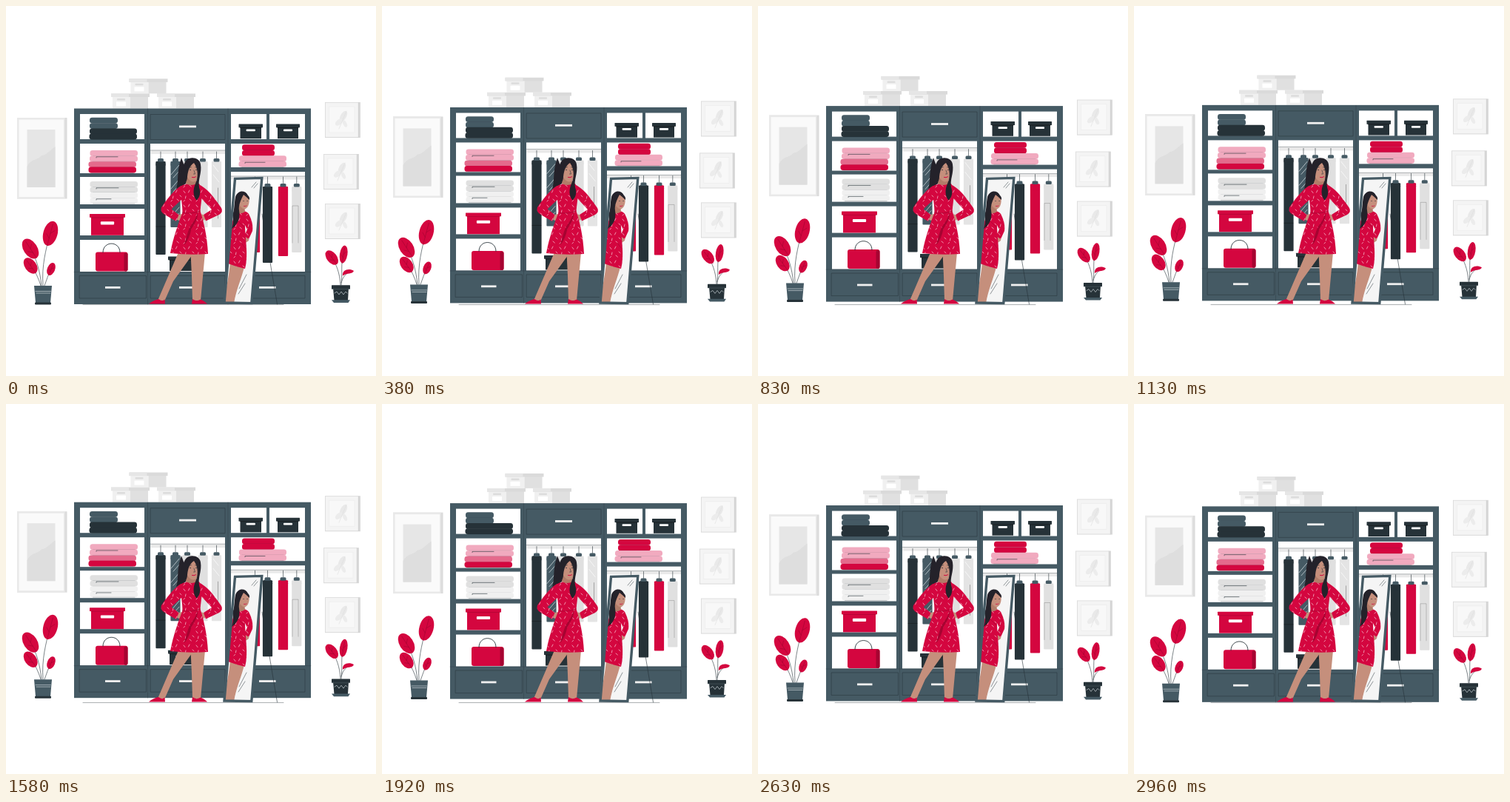
These frames come from a looping animation (500 by 500 pixels, 3000 ms). An HTML page:

```html
<!DOCTYPE html>
<html>
<head>
<meta charset="utf-8">
<style>
html, body { margin: 0; width: 100%; height: 100%; overflow: hidden; background: #fff; }
svg { display: block; width: 100vw; height: 100vh; }
</style>
</head>
<body>
<svg id="stage" viewBox="0 0 500 500" fill="none" stroke-linecap="round" stroke-linejoin="round"></svg>
<script>
const RED = '#d4063f', DEEP = '#a60431', PINK = '#f1aabf', ROSE = '#e46a8c';
const SLATE = '#455a64', DARK = '#263238', SKIN = '#c58f7c', HAIR = '#24222a';
const LIGHT = '#e0e0e0', PALE = '#f0f0f0', WHITE = '#fff';

// Shapes are given by their edges: left, top, right, bottom.
const box = (x, y, r, b, fill, rx = 0, more = '') =>
  `<rect x="${x}" y="${y}" width="${r - x}" height="${b - y}" fill="${fill}" rx="${rx}" ${more}/>`;
const shape = (d, fill, more = '') => `<path d="${d}" fill="${fill}" ${more}/>`;
const line = (d, color = DARK, w = .6) => `<path d="${d}" stroke="${color}" stroke-width="${w}"/>`;
const oval = (x, y, rx, ry, turn, fill) =>
  `<ellipse rx="${rx}" ry="${ry}" fill="${fill}" transform="translate(${x} ${y}) rotate(${turn})"/>`;
const group = (s, more = '') => `<g ${more}>${s}</g>`;

const folded = (x, y, r, fill) => box(x, y, r, y + 7.8, fill, 3.4) + line(`M${x + 4} ${y + 7.7}H${r - 4}`, DARK, .25);

const leaf = (x, y, rx, ry, turn) => oval(x, y, rx, ry, turn, RED) +
  group(line(`M0 ${-ry * .75}V${ry}M0 0l${rx * .5} ${-ry * .3}M0 ${ry * .4}l${-rx * .5} ${-ry * .3}`, DEEP, .6),
    `transform="translate(${x} ${y}) rotate(${turn})"`);

function hung(x, top, bottom, fill) {
  return line(`M${x} ${top - 13}V${top - 4}`) +
    box(x - 6.6, top, x + 6.6, bottom, fill, 1) +
    box(x - 6.6, top - 1, x + 6.6, top + 9, fill, 5) +
    box(x - 4, top - 4, x + 4, top + .5, SLATE, 1.5);
}

function crate(x, y) {
  return box(x + 2, y + 4, x + 26, y + 20, PALE) + box(x + 26, y + 4, x + 50, y + 20, LIGHT) +
    box(x, y, x + 52, y + 4.6, '#dadada') + box(x, y, x + 24, y + 4.6, '#e6e6e6') +
    box(x + 8, y + 6.5, x + 19, y + 9, '#dcdcdc', 1) + box(x + 7, y + 11, x + 20, y + 17, WHITE);
}

function lidBox(x, y, w, h, fill) {
  const c = x + w / 2;
  return box(x + 2, y + 4, x + w - 2, y + h, fill) + box(x, y, x + w, y + 4.8, fill, .5) +
    line(`M${x + 2} ${y + 5}H${x + w - 2}`, fill === RED ? DEEP : '#111', .6) +
    box(c - w * .19, y + h * .36, c + w * .19, y + h * .5, WHITE, 1);
}

function smallPicture(x, y) {
  return box(x, y, x + 48, y + 48, '#d9d9d9') + box(x + .8, y + .8, x + 45, y + 47, '#f4f4f4') +
    line(`M${x + 45.3} ${y + .5}V${y + 47.5}`, '#c9c9c9', .6) +
    box(x + 6, y + 6, x + 40, y + 41, '#f8f8f8', 0, 'stroke="#eee" stroke-width=".8"') +
    oval(x + 25, y + 19, 4, 8, 28, '#e9e9e9') + oval(x + 19, y + 27, 3.5, 6, 50, '#ececec') +
    oval(x + 27, y + 29, 2.5, 5, -25, '#ececec') + line(`M${x + 29} ${y + 12}L${x + 19} ${y + 36}`, '#dedede');
}

const pictures =
  box(15, 151, 82.5, 260.5, '#dcdcdc') + box(15, 151, 79.5, 260.5, '#e9e9e9') +
  box(17.5, 153.5, 78, 258, '#fafafa') + box(28.5, 167, 66.5, 245, '#e6e6e6') +
  shape('M28.5 245V217C34 206 42 209 48 202C54 202 58 196 66.5 190V245Z', '#dedede') +
  smallPicture(431, 130) + smallPicture(429, 200) + smallPicture(431, 267);

const frame = box(92, 138.5, 412, 403, SLATE) +
  [[100, 146, 187, 180], [100, 186, 187, 226], [100, 231, 187, 268], [100, 274, 187, 310], [100, 316, 187, 359],
   [195, 186, 296, 359], [304, 146, 352, 180], [356, 146, 404, 180], [304, 186, 404, 218], [304, 224, 404, 359]]
    .map(b => box(...b, WHITE)).join('') +
  [[195.5, 146.5, 296, 180.5], [99.5, 364.5, 189.5, 395], [195.5, 364.5, 296, 395], [304, 364.5, 404, 395]]
    .map(b => box(...b, 'none', 0, `stroke="${DARK}" stroke-width=".5"`)).join('') +
  line('M92 359.5H412M191.5 139V403M300 139V403', DARK, .3) +
  box(234, 161.5, 257, 164.3, PALE) +
  [134, 234, 342].map(x => box(x, 379, x + 20.5 + (x > 300) * 2, 381.8, PALE)).join('');

const shelves =
  folded(113, 150.7, 151, SLATE) + folded(113, 158.2, 151, SLATE) +
  folded(113, 165.4, 177, DARK) + folded(112.5, 172.6, 177, DARK) +
  folded(113.5, 195, 178, PINK) + folded(113, 202.6, 178, PINK) +
  folded(111.5, 210.2, 176, ROSE) + folded(111.5, 217.6, 176, RED) +
  folded(113.5, 237, 178, LIGHT) + folded(113.5, 244.5, 178, LIGHT) +
  folded(113.5, 252, 178, PALE) + folded(113.5, 259.3, 178, PALE) +
  line('M122 205v-1.2h29M122 247v-1.2h30M122 262v-1.2h20') +
  lidBox(113, 281, 48, 28.8, RED) +
  box(121, 332.5, 164.5, 358.5, RED, 3) + box(159.5, 333.5, 164.5, 358.5, DEEP, 2) +
  line('M131 333C131 317 154 317 154 333', DARK, .9) +
  lidBox(314.5, 159.5, 32.5, 19.7, DARK) + lidBox(365, 159.5, 32, 19.7, DARK) +
  folded(319, 187.3, 363, RED) + folded(319, 194.9, 363, RED) +
  folded(315, 202.3, 379, PINK) + folded(314.5, 209.8, 379, PINK) + line('M323 212.5v-1.2h27');

const clothes =
  box(195.5, 195, 296, 200, '#e9e9e9') + line('M195.5 195H296', DARK, .35) +
  hung(209, 210, 336, DARK) + hung(229, 210, 299, SLATE) +
  [216, 235, 254, 273].map(y => line(`M223 ${y + 12}l11 -13M226 ${y + 16}l8 -9`, '#dfe5e8', .7)).join('') +
  hung(245, 210, 299, LIGHT) + hung(266, 210, 299, LIGHT) + hung(284.5, 210, 299, '#e4e4e4') +
  line('M280 215l7 9M280 228l8 10M281 263l7 9', '#f7f7f7', 1) +
  line('M203 298H215', '#111', .4) + line('M286.5 246V287', '#777') +
  box(304, 230, 404, 234.5, '#e9e9e9') + line('M304 230H404', DARK, .35) +
  hung(336.5, 244, 333, RED) + hung(353.5, 244, 347, DARK) +
  hung(374.5, 244, 338, RED) + hung(392.8, 244, 333, LIGHT) +
  line('M387 320V270H395V320', '#777', .4) + lidBox(219, 338.5, 34, 19.5, DARK);

const plants =
  line('M50 378C48 350 54 330 59 309M48 378C46 358 41 341 33 328M47 378C44 368 40 359 34 352M52 378C55 370 57 363 61 355') +
  leaf(60, 307.3, 9.6, 17, 15) + leaf(33, 328, 9.3, 15, -33) +
  leaf(33.2, 351, 7.8, 12, -36) + leaf(61, 355.5, 5.2, 8.8, 22) +
  shape('M38 378H62L60 401H40Z', SLATE) + line('M40 385.5H60.5M41 388H60', '#c9d2d6', .7) +
  box(39, 400.5, 61, 403.5, DARK, 1) +
  line('M452 377C451 360 446 348 440 340M453 377C455 362 452 348 456 335M453 374C455 367 458 363 463 360') +
  leaf(440.3, 340, 6.8, 11.2, -38) + leaf(456.2, 335.5, 5.2, 12, 9) +
  shape('M455 364.5C454 356 464 354 470 358C468 363 461 360 455 364.5Z', RED) +
  shape('M442 381H463L462 398H443.5Z', DARK) + box(440, 377.3, 465, 382.5, DARK, .5) +
  line('M440.5 382.6H464.5', '#58666d', .5) +
  line('M444 388l3 -2 3 4 3 -4 3 4 3 -4 2 2', '#c9d2d6', .7) +
  shape('M440 397.3H465L462.5 401H443Z', SLATE);

const dress = (d, more) => shape(d, RED, more) + shape(d, 'url(#dashes)');

const woman =
  shape('M237 205C230 225 234 236 230 247C239 243 245 241 247 232Z', HAIR) +
  shape('M233 333H254L226 372L214.5 398H205Z', SKIN) +
  shape('M249.5 333H269L263 398H252L251 365Z', SKIN) +
  shape('M206 396Q211 400 214.5 396.5L215 402.5H193Q198 398 206 396Z', RED) +
  shape('M252 396Q257 400 263 396.5Q269 399 272 402.5H251Z', RED) +
  oval(235.5, 285.5, 5.5, 4, -25, SKIN) + oval(264.5, 285.5, 5.5, 4, 25, SKIN) +
  dress('M241 240.5C230 245 219 259 210 272Q208 277 213 281L230 291L233.5 282L223.5 274.5L239 260Z') +
  dress('M259 240.5C272 246 280 257 291 273Q294 278 288 282L270 290.5L267 282L278 275L264 260Z') +
  dress('M243 240.5L261 240C267 250 264 262 262.5 277C267 291 272 311 273 335Q248 337 222 334C226 312 233 294 238.5 279C239 265 232 250 243 240.5Z') +
  shape('M259 278C257 290 249 295 246 305C244 312 242 317 241 323C246 317 249 309 250 303C253 295 260 290 259 278Z', DEEP) +
  line('M238.5 279Q250 282 262.5 277', DEEP, .8) +
  shape('M244 227H256L258 240Q250 244 243 240Z', '#b27c69') +
  shape('M243 213Q244 208 252 208Q262 209 261 221C261 232 258 238 252 237.5C245 236 242 226 243 213Z', SKIN) +
  shape('M236 243C235 229 239 213 244 208C250 203 262 205 263 214C265 226 259 234 261 245C264 253 261 260 257.5 262.5C252 256 253 247 256 240C260 232 260 220 254 212C248 216 246 222 245 231C245 238 240 243 236 243Z', HAIR) +
  line('M249 221.5h.1M257 221.5h.1', DARK, 1.4) +
  line('M247 218.5l3.5 -.8M255.5 217.8l3 .6M254 222l1.5 5h-2', DARK, .6) +
  line('M251.5 231.5Q254 232.5 256.5 230.8', RED, 1);

const glass = '309.5,233.4 345.8,232.4 331.8,401.6 295,401';
const reflection =
  shape('M303 345L322 352C319 367 311 383 308 402H295C296 384 302 365 303 345Z', SKIN) +
  oval(324, 316, 4.5, 3.3, -30, SKIN) +
  dress('M312 279C320 276 327 277 329 283C333 291 334 299 333 304L328 315L322 311L326 302L323 296C323 313 328 338 323 355Q310 352 300 348C305 326 300 292 312 279Z') +
  shape('M313 268H322L323 278Q317 282 312 279Z', '#b27c69') +
  shape('M314 254Q323 250 328 258C330 266 327 274 322 274.5C316 273 313 266 314 254Z', SKIN) +
  shape('M327 256C323 248 313 249 310 258C308 269 309 276 306 282C308 291 307 297 304 302C313 296 317 287 315 276C314 270 317 262 321 255Q325 258 329 262Q329.5 258 327 256Z', HAIR) +
  line('M321 263.5h.1M326 263.5h.1', DARK, 1.2) + line('M321.5 270.5Q323.5 271 325 270', RED, .8) +
  line('M322 299L314 291M318 320L323 327', DEEP, .6);

const mirror =
  `<polygon points="${glass}" fill="#f5f5f5"/>` + group(reflection, 'clip-path="url(#glass)"') +
  line('M332 245l6 -7M335 246l5 -6M315 382l10 -19M314 389l9 -14', DARK, .5) +
  `<polygon points="${glass}" stroke="${SLATE}" stroke-width="3.4" stroke-linejoin="miter"/>`;

stage.innerHTML = `<defs>
  <pattern id="dashes" width="17" height="19" patternUnits="userSpaceOnUse">
    ${line('M2 3l2 2.6M10 2l-1.5 3M14 9l2 1.8M5 10l-.6 3M10 14l2.4 2M2 17l1.6 -1.5', '#f7c3d1', .75)}
  </pattern>
  <clipPath id="glass"><polygon points="${glass}"/></clipPath></defs>` +
  line('M104 403.6H375', DARK, .4) +
  group(pictures + crate(166.5, 98.3) + crate(142, 118.4) + crate(204, 118.4) + frame + shelves + clothes + plants, 'id="room"') +
  line('M346 281L366.5 403', DARK, .6) + woman + mirror;

const room = document.getElementById('room');
function draw(now) {
  const p = now % 3000 / 1500;
  room.setAttribute('transform', `translate(0 ${-6.15 * (1 - Math.abs(1 - p))})`);
  requestAnimationFrame(draw);
}
draw(performance.now());
</script>
</body>
</html>
```
